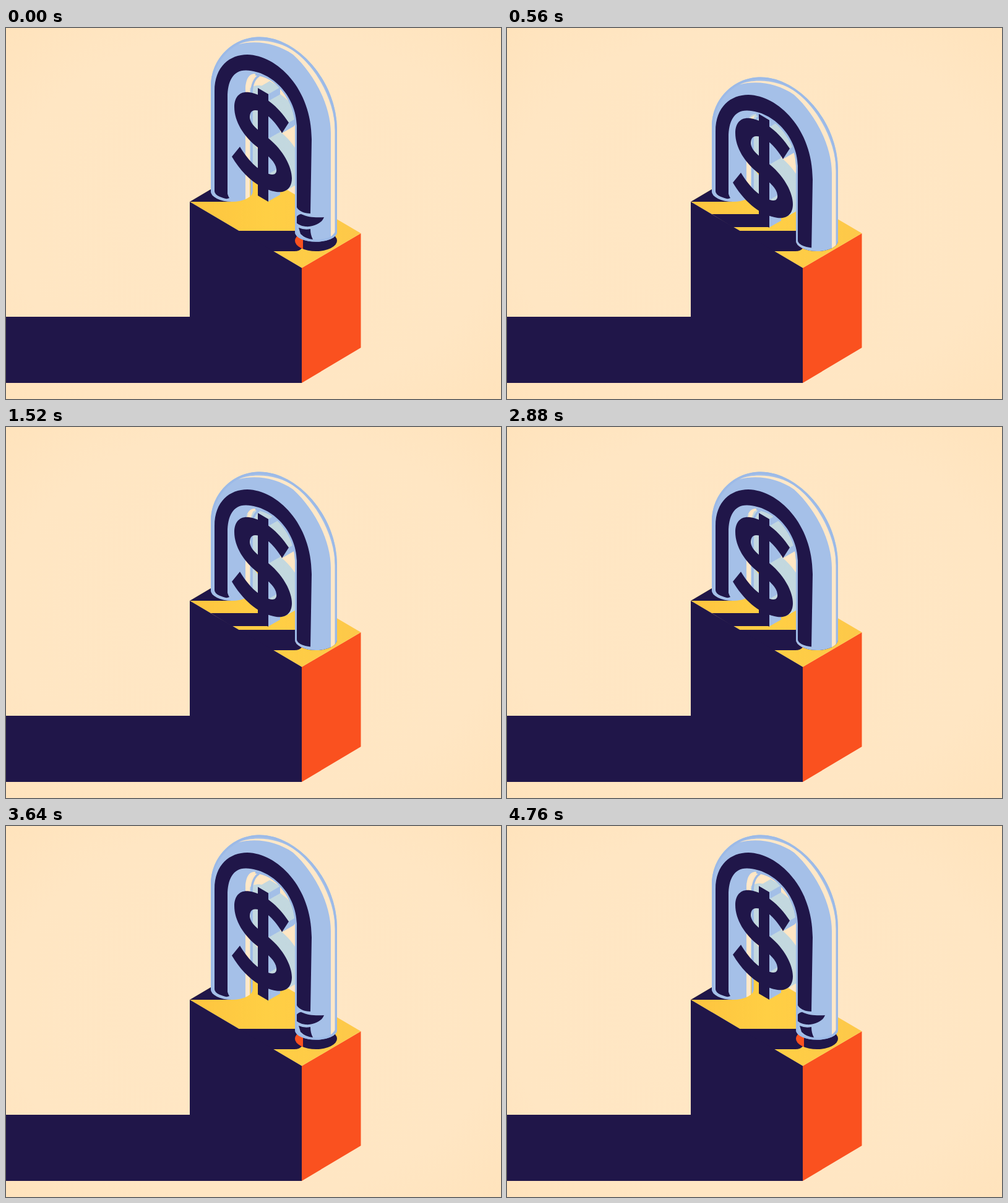
Animation, 800 px wide and 600 px high, one loop 4.8 s. Source, as an HTML page:

```html
<!DOCTYPE html>
<html lang="en">
<head>
<meta charset="utf-8">
<title>Padlock</title>
<style>
  html, body { margin: 0; width: 100%; height: 100%; overflow: hidden; background: #ffe6c3; }
  svg { display: block; width: 800px; height: 600px; }
  .navy { fill: #201649; }
  .cream { fill: #ffe8c8; }
  .body { fill: #a5c0e8; }
  .pale { fill: #c3d8df; }
  .side { fill: #a3bfe7; }
  .line { fill: none; stroke: #9cbae7; stroke-width: 3.5; }
</style>
</head>
<body>
<svg viewBox="0 0 800 600">
  <defs>
    <radialGradient id="paper" cx="50%" cy="50%" r="72%">
      <stop offset="0" stop-color="#ffe7c5"/>
      <stop offset=".7" stop-color="#ffe6c3"/>
      <stop offset="1" stop-color="#ffe3bc"/>
    </radialGradient>
    <linearGradient id="top" x1="0" y1="0" x2="1" y2="0">
      <stop offset="0" stop-color="#fdc43f"/>
      <stop offset=".45" stop-color="#ffcf44"/>
      <stop offset="1" stop-color="#fdc84a"/>
    </linearGradient>

    <!-- the shackle is visible only above the front rims of its two holes -->
    <clipPath id="rims">
      <path d="M320 0H545V344H535A34 17 0 0 1 467 344V264H399A34 17 0 0 1 331 264H320Z"/>
    </clipPath>
    <clipPath id="innerRims">
      <path d="M320 0H545V344H532A31 12 0 0 1 470 344V264H393A28 12.5 0 0 1 337 264H320Z"/>
    </clipPath>
    <clipPath id="holeLeft"><rect x="460" y="320" width="20" height="45"/></clipPath>

    <path id="ess" d="M446 170C436 152 418 133 403 133C396 133 394 138 394 145C395 156 408 166 425 179
      C448 198 462 224 462 243C462 260 451 267 437 265C410 261 384 240 365 208L378 192
      C390 212 407 231 425 236C434 239 438 235 437 228C436 217 424 207 408 194
      C384 176 369 151 369 128C369 110 379 102 393 104C416 107 440 127 457 153Z"/>
    <path id="stem" d="M407 97L424 107V281L407 271Z"/>
  </defs>

  <rect width="800" height="600" fill="url(#paper)"/>

  <!-- box -->
  <path fill="#fa511f" d="M478 388L573.500 332V517L478 574Z"/>
  <path fill="url(#top)" d="M297 281L392 225L573.500 332L478 388Z"/>
  <path class="navy" d="M297 281L340 255.500L366 281Z"/>
  <path class="navy" d="M374 328H500V344L478 356Q475 361 466 361H430Z"/>
  <path id="shade" class="navy" d="M331 301H407L424 322H365Z"/>
  <path class="navy" d="M0 467H297V281L478 388V574H0Z"/>

  <!-- right hole -->
  <ellipse class="navy" cx="501" cy="344" rx="34" ry="17"/>
  <ellipse cx="501" cy="344" rx="34" ry="17" fill="#fa511f" clip-path="url(#holeLeft)"/>

  <g id="depth" class="coin"></g>

  <!-- shackle -->
  <g clip-path="url(#rims)">
    <g class="lock">
      <path class="body" d="M331 400V95C331 48 368 14.500 410 14.500C470 14.500 535 85 535 165V330
        A34 15.500 0 0 1 467 330V158C466 114 436 76 402 74C392 74 387 84 387 100V400Z"/>
      <path class="cream" d="M376 26.500C400 16 440 19 468 39C506 69 532 123 532 167V330L525 338V170
        C525 126 499 75 464 43C438 25 405 19 376 26.500Z"/>
      <path class="cream" d="M387 400V100C387 88 392 79 401 76C396 83 394 94 394 105V400Z"/>
      <path class="line" d="M397 400V105C397 91 402 81 409 77"/>
      <path class="line" d="M332.750 400V95C332.750 49 369 16.250 410 16.250C469 16.250 533.250 86 533.250 165V330
        A32.250 14 0 0 1 468.750 330V158C467 115 436 77 403 75"/>
      <path class="navy" d="M473 323Q482 327 492 325Q492 335 496 342Q484 341 476 333Z"/>
    </g>
  </g>
  <g clip-path="url(#innerRims)">
    <g class="lock navy">
      <path d="M337 400V102C337 62 362 43 390 43C438 44 494 98 494 180L492 300C482 300 473 296 470 290V158
        C469 112 432 70 388 68.500C367 68 358 86 358 112V400Z"/>
      <path d="M467 312C468 306 472 301 477 301C488 306 500 307 514 306C510 317 495 322 484 321
        C476 320 470 317 467 312Z"/>
    </g>
  </g>
  <path class="navy" d="M357 260Q357 269 361 275Q355 278 348 273Z"/>

  <g class="coin navy">
    <use href="#ess"/>
    <use href="#stem"/>
  </g>
</svg>

<script>
  const LOOP = 4800, LAYERS = 19;
  const lockKeys = [[0, 0], [240, 30], [480, 62], [560, 65], [860, 60], [1160, 58], [2920, 58],
    [3160, 35.5], [3200, 31], [3420, 10], [3640, 0], [4800, 0]];
  const coinKeys = [[0, 0], [200, 15], [400, 36], [520, 42], [3200, 42], [3400, 19],
    [3640, 1.5], [3800, -2], [4280, 12], [4760, 0], [4800, 0]];

  // Smooth interpolation that rests at turning points and plateaus
  function slope(keys, i) {
    if (!i || i === keys.length - 1) return 0;
    const rate = j => (keys[j + 1][1] - keys[j][1]) / (keys[j + 1][0] - keys[j][0]);
    const a = rate(i - 1), b = rate(i);
    return a * b > 0 ? 2 * a * b / (a + b) : 0;
  }

  function sample(keys, t) {
    let i = 0;
    while (i < keys.length - 2 && t >= keys[i + 1][0]) i++;
    const [t0, v0] = keys[i], [t1, v1] = keys[i + 1];
    const d = t1 - t0, u = (t - t0) / d, w = 1 - u;
    return v0 * w * w * (1 + 2 * u) + v1 * u * u * (3 - 2 * u) +
      d * u * w * (slope(keys, i) * w - slope(keys, i + 1) * u);
  }

  // Sides of the dollar sign, painted from back to front
  let sides = '';
  for (let i = LAYERS; i > 0; i--) {
    sides += `<g transform="translate(${i} ${-i * 0.57})">` +
      '<use href="#ess" class="pale"/><use href="#stem" class="side"/></g>';
  }
  sides += '<path class="side" d="M446 170L457 153L476 142L465 159Z"/>' +
    '<path class="pale" d="M407 97L426 86L443 96L424 107Z"/>';
  document.getElementById('depth').innerHTML = sides;

  const locks = document.querySelectorAll('.lock');
  const coins = document.querySelectorAll('.coin');
  const shade = document.getElementById('shade');
  const move = (el, y) => el.setAttribute('transform', `translate(0 ${y.toFixed(2)})`);

  // The cast shadow runs off the top face as the coin rises
  function cast(lift) {
    const x = Math.max(0, 407 - 6 * lift);
    shade.setAttribute('d', `M331 301H${Math.max(331, x)}L${Math.max(365, x + 17)} 322H365Z`);
  }

  function draw(now) {
    const t = now % LOOP;
    const lockY = sample(lockKeys, t), coinY = sample(coinKeys, t);
    locks.forEach(el => move(el, lockY));
    coins.forEach(el => move(el, coinY));
    cast(42 - coinY);
  }

  let start;
  function tick(now) {
    start ??= now;
    draw(now - start);
    requestAnimationFrame(tick);
  }
  draw(0);
  requestAnimationFrame(tick);
</script>
</body>
</html>
```
